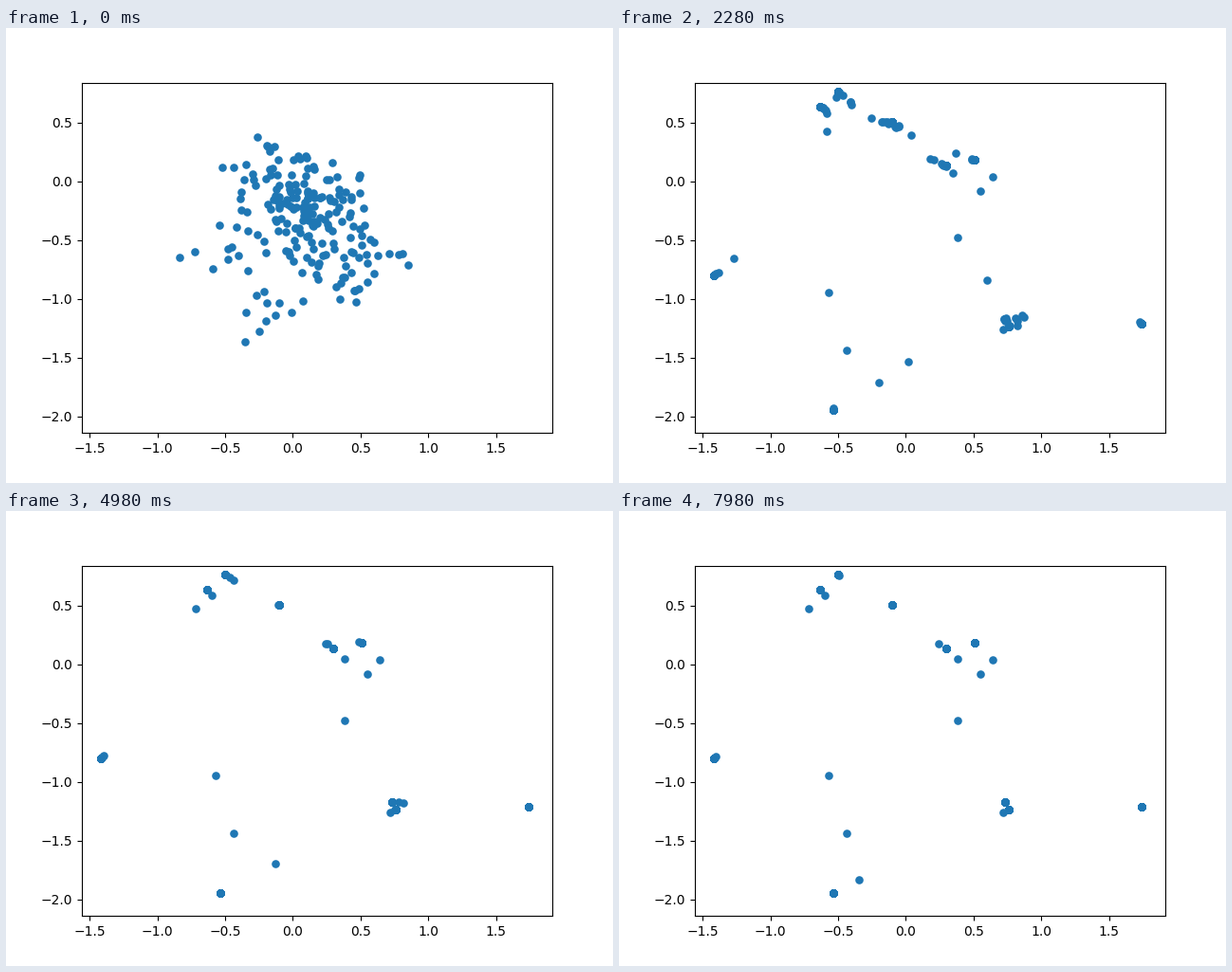
These frames come from a looping animation (640x480 px, 8000 ms). A matplotlib script:

```python
import numpy as np
import matplotlib.pyplot as plt
from matplotlib.animation import FuncAnimation

LOOP, INTERVAL, STEP = 8000, 20, 30
CENTER = np.array([.1, -.38])
rng = np.random.default_rng(11)

# Resting points that gather many dots, and how many
WELLS = np.array([
    (-.497, .763), (-.632, .64), (-.104, .505), (.3, .133), (.51, .183),
    (.728, -1.172), (.756, -1.237), (1.741, -1.211), (-1.414, -.8),
    (-.533, -1.945),
])
SHARES = [22, 23, 26, 22, 20, 22, 12, 14, 13, 15]

# Resting points of single dots
STRAYS = np.array([
    (-.72, .475), (-.595, .585), (.24, .175), (.38, .05), (.64, .04),
    (.55, -.085), (.385, -.48), (.72, -1.257), (-.44, -1.435),
    (-.57, -.942), (-1.405, -.785),
])

goal = np.concatenate([np.repeat(WELLS, SHARES, axis=0), STRAYS])
n = len(goal)

# Start: a cloud around the centre, drawn unevenly towards the goals
pull = .15 + .5 * rng.random((n, 1)) ** 2
noise = np.clip(rng.normal(size=(n, 2)), -1.8, 1.8) * [.27, .23]
start = CENTER + pull * (goal - CENTER) + (1 - pull) * noise

# Detour: a place between the goal and one of its neighbours
gaps = np.linalg.norm(goal[:, None] - WELLS, axis=2)
rank = rng.integers(1, 5, n)
neighbour = WELLS[gaps.argsort(axis=1)[np.arange(n), rank]]
via = goal + rng.uniform(.05, .55, (n, 1)) * (neighbour - goal)

# Arrival: outer dots come first, a few very late
reach = np.linalg.norm(start - CENTER, axis=1)
arrival = 1700 * rng.lognormal(0, .6, n)
arrival *= np.clip(np.sqrt(.45 / reach), .55, 1.3)
arrival[-len(STRAYS):] = arrival[-len(STRAYS):].clip(max=3600)


def positions(t):
    drift = 1 - np.exp(-t / 900)
    x = np.clip(t / arrival, 0, 1)[:, None]
    settle = x * x * (3 - 2 * x)
    p = start + drift * (via - start)
    return p + settle * (goal - p)


fig, ax = plt.subplots(figsize=(6.4, 4.8), dpi=100)
ax.set_xlim(-1.5568, 1.914)
ax.set_ylim(-2.139, .8415)
ax.set_xticks(np.arange(-1.5, 1.6, .5))
ax.set_yticks(np.arange(-2, .6, .5))
dots, = ax.plot(*positions(0).T, "o", color="#1f77b4",
                markersize=6.2, markeredgewidth=0)


def update(i):
    t = i * INTERVAL // STEP * STEP
    dots.set_data(*positions(t).T)
    return dots,


anim = FuncAnimation(fig, update, frames=LOOP // INTERVAL, interval=INTERVAL,
                     repeat=True, repeat_delay=0)
plt.show()
```
